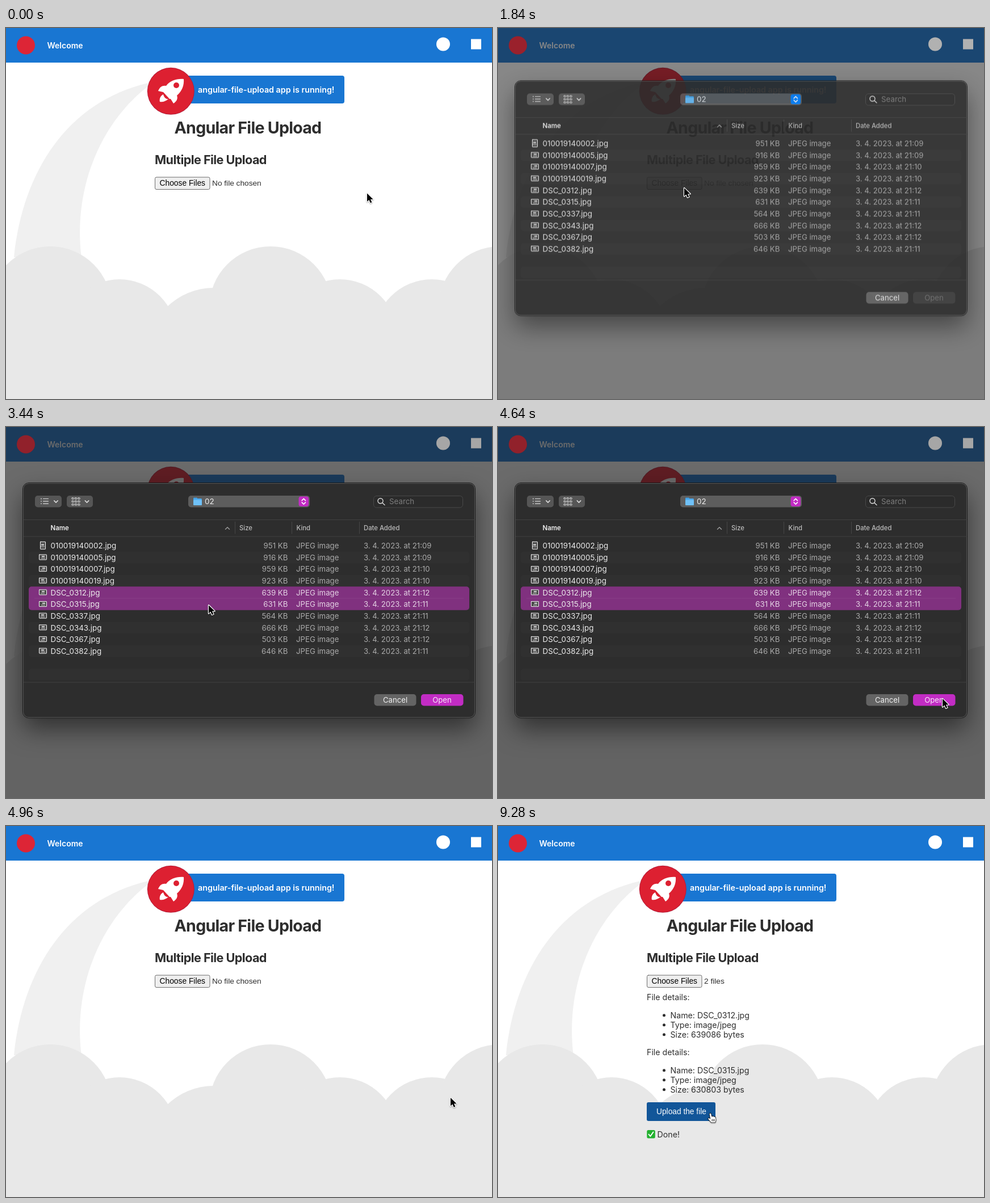
Write an HTML page with a canvas that moves like this. It is 856 px wide and 654 px high and loops after 9.92 s.

```html
<!DOCTYPE html>
<html lang="en">
<head>
<meta charset="utf-8">
<title>File upload</title>
<style>
html, body { margin: 0; width: 100%; height: 100%; overflow: hidden; background: #fff; }
canvas { display: block; }
</style>
</head>
<body>
<canvas id="stage" width="856" height="654"></canvas>
<script>
const W = 856, H = 654, LOOP = 9920, STEP = 80;
const UI = 'Inter, sans-serif';
const FORM = '"Liberation Sans", Arial, sans-serif';
const BLUE = '#1976d2', INK = '#2e2e2e', ACCENT = '#c22cc4';

const stage = document.getElementById('stage').getContext('2d');
const sheetCanvas = document.createElement('canvas');
sheetCanvas.width = W;
sheetCanvas.height = H;
const sheet = sheetCanvas.getContext('2d');
let g = stage;

const clamp = v => Math.max(0, Math.min(1, v));
const smooth = v => { v = clamp(v); return v * v * (3 - 2 * v); };

// y is the middle of the capital letters
function text(s, x, y, size, { color = INK, weight = 400, font = UI, align = 'left', spacing = 0 } = {}) {
  g.font = `${weight} ${size}px ${font}`;
  g.letterSpacing = `${spacing * size}px`;
  g.textAlign = align;
  g.fillStyle = color;
  g.fillText(s, x, y + size * 0.36);
}

function box(x, y, w, h, r, fill, stroke) {
  g.beginPath();
  g.roundRect(x, y, w, h, r);
  if (fill) { g.fillStyle = fill; g.fill(); }
  if (stroke) { g.strokeStyle = stroke; g.lineWidth = 1; g.stroke(); }
}

function disc(x, y, r, fill) {
  g.beginPath();
  g.arc(x, y, r, 0, 7);
  g.fillStyle = fill;
  g.fill();
}

function line(points, color, width = 1) {
  g.beginPath();
  points.forEach(([x, y]) => g.lineTo(x, y));
  g.strokeStyle = color;
  g.lineWidth = width;
  g.lineCap = g.lineJoin = 'round';
  g.stroke();
}

function shape(d, fill) {
  g.fillStyle = fill;
  g.fill(new Path2D(d));
}

// ---------- page ----------

const CLOUDS = [[78, 493, 108], [200, 543.4, 100.4], [366, 576, 118], [466, 493, 108],
  [588, 545, 102], [750, 545, 102], [870, 493, 108]];

function background() {
  g.fillStyle = '#fff';
  g.fillRect(0, 0, W, H);
  shape('M14 404 C30 250 110 130 250 97 V103 C175 160 117 272 133 404 Z', '#f0f0f0');
  CLOUDS.forEach(c => disc(...c, '#e8e8e8'));
  g.fillRect(0, 494, W, H - 494);
}

function logos() {
  disc(35, 30.5, 16, '#dd2536');
  disc(770, 28.5, 12, '#fff');
  box(819, 19.5, 18, 18, 0, '#fff');
}

function header() {
  g.fillStyle = BLUE;
  g.fillRect(0, 0, W, 61);
  text('Welcome', 72.5, 30.5, 14, { color: '#fff', weight: 600 });
  logos();
}

function banner() {
  box(290, 84, 306, 49, 4, BLUE);
  text('angular-file-upload app is running!', 338, 109, 14.3, { color: '#fff', weight: 600 });
  disc(290.3, 111.3, 41.5, '#b51c38');
  disc(290.3, 111.3, 40.5, '#dd2031');
  shape('M313 90 C300 89 289 93 282 102 C275 101 271 104 268 111 L277 113 L288 125 L290 125 ' +
    'L295 133 C301 129 303 124 301 119 C310 111 314 101 313 90 Z', '#fff');
  shape('M277 117 C271 120 270 126 271 130 C276 131 282 129 286 125 C281 126 278 121 277 117 Z', '#fff');
  disc(300, 101, 5, '#dd2031');
}

function fileDetails(y, name, bytes) {
  text('File details:', 262, y, 14.2);
  [`Name: ${name}`, 'Type: image/jpeg', `Size: ${bytes} bytes`].forEach((s, i) => {
    const rowY = y + 31.7 + 17 * i;
    disc(292.5, rowY, 2.5, INK);
    text(s, 303.5, rowY, 14.2);
  });
}

function status(t) {
  const y = 543.5;
  if (t < 7280) {
    disc(269.3, y, 7, '#f9bd38');
    disc(266.8, y - 1, 1.2, '#5b3a17');
    disc(271.8, y - 1, 1.2, '#5b3a17');
    text('Waiting to upload...', 280.5, y, 14.2);
  } else if (t < 8240) {
    shape('M264 537 H275 V538 Q275 541 270.5 543.5 Q275 546 275 549 V550 H264 V549 ' +
      'Q264 546 268.5 543.5 Q264 541 264 538 Z', '#b9cbd6');
    shape('M266 540 H273 L269.5 543 Z M265 549 L269.5 545 L274 549 Z', '#e6a93c');
    line([[264, 537], [275, 537]], '#a5683c', 1.5);
    line([[264, 550], [275, 550]], '#a5683c', 1.5);
    text('Uploading...', 280.5, y, 14.2);
  } else {
    box(262.3, 536, 14.5, 14.5, 2.5, '#22b12f');
    line([[265.5, 543.5], [268.3, 547], [273.5, 539.5]], '#fff', 2);
    text('Done!', 280.5, y, 14.2);
  }
}

function page(t, pointer) {
  const chosen = t >= 5440;
  const over = (x0, y0, x1, y1) => pointer.x > x0 && pointer.x < x1 && pointer.y > y0 && pointer.y < y1;
  background();
  header();
  banner();
  text('Angular File Upload', 296.5, 176, 28.6, { weight: 700, spacing: -0.026 });
  text('Multiple File Upload', 262, 232, 21.6, { weight: 700, spacing: -0.026 });

  const hot = t < 2400 && over(262, 262, 360, 290);
  box(262.5, 263, 96.5, 21.5, 2.5, hot ? '#e5e5e5' : '#efefef', hot ? '#333' : '#6d6d6d');
  text('Choose Files', 270.5, 273.3, 13.8, { font: FORM, color: '#000' });
  text(chosen ? '2 files' : 'No file chosen', 363, 273.3, 13.7, { font: FORM });

  if (!chosen) return;
  fileDetails(302, 'DSC_0312.jpg', 639086);
  fileDetails(399, 'DSC_0315.jpg', 630803);
  box(262, 487, 121, 33, 3, pointer.hand ? '#125699' : BLUE);
  text('Upload the file', 279, 503.3, 13.75, { font: FORM, color: '#fff' });
  status(t);
}

// ---------- file dialog ----------

const FILES = [
  ['010019140002', 951, '09'], ['010019140005', 916, '09'], ['010019140007', 959, '10'],
  ['010019140019', 923, '10'], ['DSC_0312', 639, '12'], ['DSC_0315', 631, '11'],
  ['DSC_0337', 564, '11'], ['DSC_0343', 666, '12'], ['DSC_0367', 503, '12'], ['DSC_0382', 646, '11']
];
const rowMiddle = i => 209.3 + 20.64 * i;

function chevron(x, y, dir, color, w = 3.2) {
  line([[x - w, y - dir * w / 2], [x, y + dir * w / 2], [x + w, y - dir * w / 2]], color, 1.5);
}

function toolbar(accent) {
  box(51, 121, 47, 20.5, 5, '#565656');
  box(107, 121, 46, 20.5, 5, '#565656');
  for (let i = 0; i < 3; i++) {
    const y = 126.5 + i * 4.3;
    disc(62, y, 0.9, '#ddd');
    line([[65.5, y], [74.5, y]], '#ddd', 1.2);
    for (let j = 0; j < 3; j++) {
      box(116 + j * 5.4, 124.8 + i * 5.4, 3.4, 2.4, 0.5, null, '#ddd');
    }
  }
  chevron(88, 131.5, 1, '#ddd');
  chevron(142.5, 131.5, 1, '#ddd');

  box(321, 121, 214, 20.5, 5, '#5d5d5d');
  box(330, 124.5, 7, 5, 1, '#3f9de0');
  box(330, 126, 15, 12, 1.5, '#4aa9ee');
  box(330, 128.5, 15, 9.5, 1.5, '#6fc1f8');
  text('02', 350, 131, 13.4, { color: '#eee' });
  box(515.5, 122.5, 17.5, 17.5, 4, accent);
  chevron(524.3, 128, -1, '#fff');
  chevron(524.3, 134.5, 1, '#fff');

  box(647.5, 121.5, 157, 20.5, 5, '#2b2b2b', '#484848');
  g.beginPath();
  g.arc(659.5, 130.2, 4.5, 0, 7);
  g.strokeStyle = '#ddd';
  g.lineWidth = 1.4;
  g.stroke();
  line([[663, 133.8], [667, 137.5]], '#ddd', 1.4);
  text('Search', 675, 131.5, 13.3, { color: '#7d7d7d' });
}

function columns() {
  [163.5, 193, 450].forEach(y => line([[31, y], [825, y]], '#414141'));
  [403.5, 503.5, 622.5].forEach(x => line([[x, 167], [x, 188]], '#454545'));
  text('Name', 78.5, 178, 11.4, { color: '#f0f0f0', weight: 600 });
  chevron(390, 178.5, -1, '#999', 3.5);
  [['Size', 411], ['Kind', 511.5], ['Date Added', 630]].forEach(([s, x]) =>
    text(s, x, 178, 11.3, { color: '#bcbcbc', weight: 500 }));
}

function thumbnail(i, y) {
  const [w, h] = i ? [13, 9] : [9, 13];
  box(65 - w / 2, y - h / 2 - 0.5, w, h, 0.5, '#4c4c4c', '#f4f4f4');
  g.fillStyle = '#c4c4c4';
  g.fillRect(62 + (i % 3), y - 3, 5, 2.5);
  g.fillStyle = '#8c8c8c';
  g.fillRect(61 + (i % 2), y + 0.5, 7, 2);
}

function fileRows(selected) {
  for (let i = 1; i < 12; i += 2) box(40, rowMiddle(i) - 10.3, 776, 20.6, 5, '#303030');
  if (selected) box(40, rowMiddle(4) - 10.5, 776, 20.7 * selected, 5, '#80317f');
  if (selected > 1) line([[50, 302], [806, 302]], '#8b438a', 0.7);
  FILES.forEach(([name, size, minute], i) => {
    const y = rowMiddle(i);
    const color = i >= 4 && i < 4 + selected ? '#e4d3e4' : '#aaa';
    thumbnail(i, y);
    text(`${name}.jpg`, 78.5, y, 13.4, { color: '#ececec' });
    text(`${size} KB`, 496.5, y, 13.3, { color, align: 'right' });
    text('JPEG image', 511, y, 13.2, { color });
    text(`3. 4. 2023. at 21:${minute}`, 630, y, 13.15, { color });
  });
}

function dialog(t, opacity) {
  const selected = (t >= 2720) + (t >= 3120);
  g = sheet;
  g.clearRect(0, 0, W, H);
  g.shadowColor = 'rgba(0,0,0,.5)';
  g.shadowBlur = 44;
  g.shadowOffsetY = 20;
  box(30, 99, 796, 413.5, 10, '#2d2d2d');
  g.shadowColor = 'transparent';
  box(29.5, 98.5, 797, 414.5, 10.5, null, '#161616');
  box(30.5, 99.5, 795, 412.5, 9.5, null, '#5a5a5a');
  toolbar(t < 1920 ? '#0a84ff' : ACCENT);
  columns();
  fileRows(selected);
  box(648.5, 471, 74, 20.5, 5, '#646464');
  text('Cancel', 685.5, 481.2, 13.2, { color: '#f0f0f0', align: 'center' });
  box(731, 471, 74.5, 20.5, 5, selected ? ACCENT : '#3d3d3d');
  text('Open', 768, 481.2, 13.2, { color: selected ? '#f8eaf8' : '#717171', align: 'center' });

  g = stage;
  g.fillStyle = `rgba(28,28,28,${0.65 * opacity ** 1.6})`;
  g.fillRect(0, 0, W, H);
  g.globalAlpha = 0.4 * opacity;
  logos();
  g.globalAlpha = opacity;
  g.drawImage(sheetCanvas, 0, -45 * (1 - opacity));
  g.globalAlpha = 1;
}

// ---------- pointer ----------

// [start, end, x, y, lift of the path]
const MOVES = [
  [0, 1040, 340, 286, 0], [1040, 1360, 328, 282, 0], [2640, 2960, 328, 303, 0],
  [3280, 4320, 783, 479, 0], [5600, 6640, 375, 503, 94], [6640, 6720, 375, 506, 0],
  [7520, 7680, 374, 506.5, 0]
];

function pointerAt(t) {
  let x = 636, y = 291.5;
  for (const [start, end, toX, toY, lift] of MOVES) {
    if (t < start) break;
    const k = smooth((t - start) / (end - start));
    x += (toX - x) * k;
    y += (toY - y) * k - 2 * lift * k * (1 - k);
  }
  return { x, y, hand: t >= 5440 && x < 383 && y > 487 };
}

const ARROW = new Path2D('M0 0 V14.5 L3.4 11.4 L5.8 16.8 L8.4 15.7 L6 10.4 H10.6 Z');
const HAND = new Path2D('M-1.5 1 Q0 -1 1.3 1 L2.3 6 Q3.5 4.5 4.8 6 Q6 5 7.2 6.6 Q9 6 9.3 8 ' +
  'L9.8 12 L8.6 16 H1.6 L-3.6 10.2 Q-4 8 -2 8.6 L0.2 10.2 Z');

function drawPointer({ x, y, hand }) {
  g.save();
  g.translate(x, y);
  g.lineJoin = 'round';
  g.shadowColor = 'rgba(0,0,0,.35)';
  g.shadowBlur = 2;
  g.shadowOffsetY = 1;
  g.lineWidth = hand ? 1.3 : 2.4;
  g.strokeStyle = hand ? '#000' : '#fff';
  g.fillStyle = hand ? '#fff' : '#000';
  const path = hand ? HAND : ARROW;
  g.stroke(path);
  g.shadowColor = 'transparent';
  g.fill(path);
  if (hand) [3, 5.2, 7.2].forEach(dx => line([[dx, 10.5], [dx, 13.5]], '#000', 0.8));
  g.restore();
}

function frame(now) {
  const t = Math.floor((now % LOOP) / STEP) * STEP;
  const pointer = pointerAt(t);
  const opacity = smooth((t - 1560) / 360) * (1 - smooth((t - 4640) / 300));
  page(t, pointer);
  if (opacity > 0) dialog(t, opacity);
  drawPointer(pointer);
}

const began = performance.now();
function tick() {
  frame(performance.now() - began);
  requestAnimationFrame(tick);
}
tick();
</script>
</body>
</html>
```
